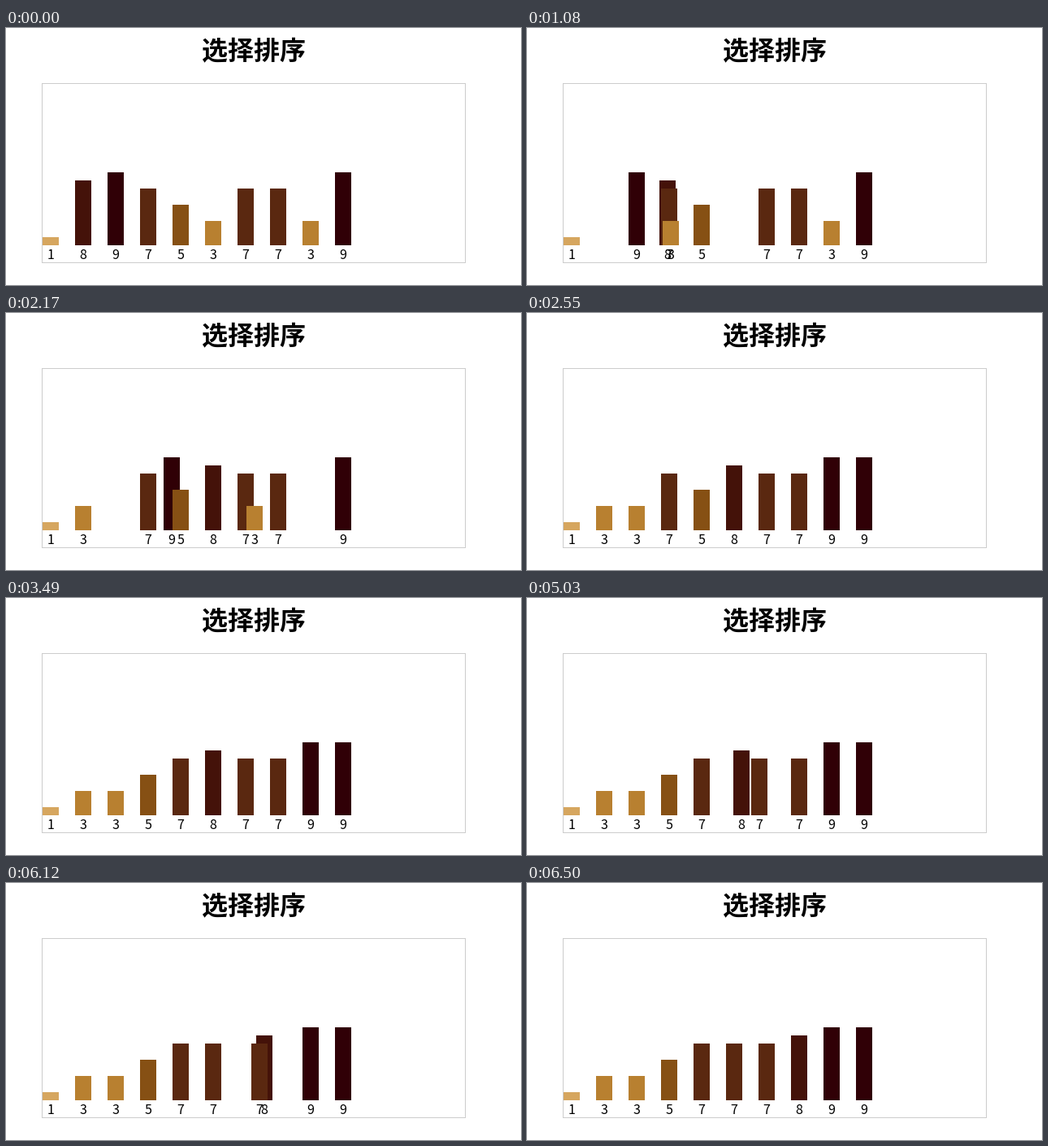
A matplotlib script for the animation above (6820 ms loop, 634x317 px).

```python
import matplotlib.pyplot as plt
from matplotlib.animation import FuncAnimation
from matplotlib.patches import Rectangle

W, H, DPI = 634, 317, 100
LOOP, TICK = 6820, 20
LEFT, BASE, SLOT, BAR = 45, 268, 40, 20
GLIDE, SETTLE = 500, 554
FONT = "Noto Sans CJK JP"

VALUES = [1, 8, 9, 7, 5, 3, 7, 7, 3, 9]
COLORS = {1: "#d6a65f", 3: "#b88030", 5: "#865014",
          7: "#5a2810", 8: "#441209", 9: "#300006"}
# first slot, second slot, first visible step, last step, number of steps
SWAPS = [(1, 5, 990, 1480, 7), (2, 8, 2020, 2550, 8), (3, 4, 3020, 3490, 7),
         (5, 6, 5030, 5500, 7), (6, 7, 5960, 6500, 8)]


def px(size):
    return size * 72 / DPI


def ease(x):
    """cubic-bezier(.25, .1, .25, 1)"""
    if x >= 1:
        return 1.0
    lo, hi = 0.0, 1.0
    for _ in range(30):
        s = (lo + hi) / 2
        if 0.75 * s * (1 - s) + s ** 3 < x:
            lo = s
        else:
            hi = s
    return 0.3 * s * (1 - s) ** 2 + 3 * s * s * (1 - s) + s ** 3


def progress(t, start, end, steps):
    if t < start:
        return 0.0
    if t >= end:
        return 1.0
    span = end - start
    hold = (span - 10) / (steps - 1)
    k = max(0, int((t - start - 10) / hold))
    return ease((SETTLE - span + k * hold) / GLIDE)


def positions(t):
    """Slot position of every bar at time t."""
    order = list(range(len(VALUES)))
    pos = [float(i) for i in order]
    for a, b, start, end, steps in SWAPS:
        p = progress(t, start, end, steps)
        i, j = order[a], order[b]
        pos[i] = a + (b - a) * p
        pos[j] = b + (a - b) * p
        if p < 1:
            break
        order[a], order[b] = j, i
    return pos


fig = plt.figure(figsize=(W / DPI, H / DPI), dpi=DPI, facecolor="white")
ax = fig.add_axes([0, 0, 1, 1])
ax.set_xlim(0, W)
ax.set_ylim(H, 0)
ax.axis("off")


def box(x, y, w, h, color, z):
    return ax.add_patch(Rectangle((x, y), w, h, facecolor=color, linewidth=0,
                                  antialiased=False, zorder=z))


box(44, 68, 522, 222, "#cccccc", 0)
box(45, 69, 520, 220, "white", 1)
ax.text(305, 39, "选择排序", family=FONT, weight="bold", size=px(32),
        ha="center", va="baseline", color="black")

bars, labels = [], []
for i, v in enumerate(VALUES):
    x = LEFT + SLOT * i
    bars.append(box(x, BASE - 10 * v, BAR, 10 * v, COLORS[v], 2 + i))
    labels.append(ax.text(x + BAR / 2, 285, str(v), family=FONT, size=px(16),
                          ha="center", va="baseline", color="black",
                          zorder=2 + i))


def draw(frame):
    t = frame * TICK + TICK / 2
    for bar, label, p in zip(bars, labels, positions(t)):
        x = round(LEFT + SLOT * p)
        bar.set_x(x)
        label.set_x(x + BAR / 2)
    return bars + labels


anim = FuncAnimation(fig, draw, frames=LOOP // TICK, interval=TICK,
                     repeat=True, repeat_delay=0, blit=False)
plt.show()
```
